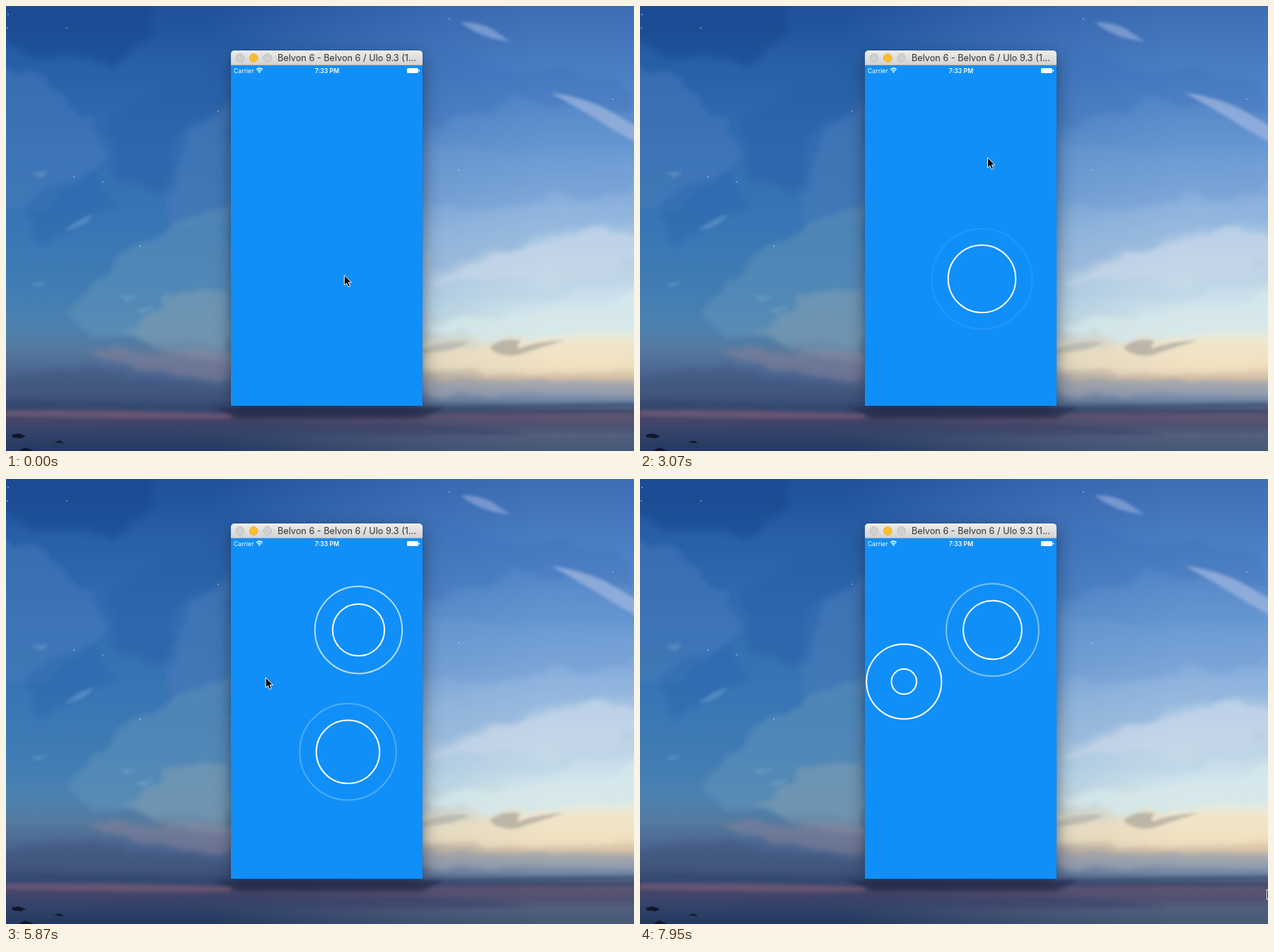
These frames come from a looping animation (888 by 630 pixels, 8 s). An HTML page:

```html
<!DOCTYPE html>
<html lang="en">
<head>
<meta charset="utf-8">
<title>Ripple rings</title>
<style>
  html, body { margin: 0; width: 100%; height: 100%; overflow: hidden; background: #2a5ca8; }
  svg { position: absolute; left: 0; top: 0; display: block; }
  .sky { will-change: transform; }
  .window {
    position: absolute; left: 318px; top: 63px; width: 271px; height: 503px;
    border-radius: 5px 5px 0 0; background: #108ff9;
    box-shadow: 0 0 1px rgba(0, 0, 0, .4), 0 9px 25px rgba(20, 25, 45, .55);
  }
  .bar {
    height: 21px; box-sizing: border-box; border-radius: 5px 5px 0 0;
    background: linear-gradient(#ececec, #d3d3d3);
    border-top: 1px solid #f6f6f6; border-bottom: 1px solid #b5b5b5;
  }
  text { font-family: Inter, Roboto, sans-serif; }
</style>
</head>
<body>
<svg class="sky" width="888" height="630" viewBox="0 0 888 630">
  <defs>
    <linearGradient id="west" x2="0" y2="630" gradientUnits="userSpaceOnUse">
      <stop offset="0" stop-color="#20509a"/>
      <stop offset=".16" stop-color="#2a62aa"/>
      <stop offset=".32" stop-color="#336eb1"/>
      <stop offset=".5" stop-color="#3876b5"/>
      <stop offset=".64" stop-color="#417db4"/>
      <stop offset=".72" stop-color="#4d82b0"/>
      <stop offset=".77" stop-color="#557a9f"/>
      <stop offset=".82" stop-color="#4c6791"/>
      <stop offset=".87" stop-color="#415981"/>
      <stop offset=".9" stop-color="#364a72"/>
      <stop offset=".93" stop-color="#45456a"/>
      <stop offset=".955" stop-color="#36436b"/>
      <stop offset="1" stop-color="#23395f"/>
    </linearGradient>
    <linearGradient id="east" x2="0" y2="630" gradientUnits="userSpaceOnUse">
      <stop offset="0" stop-color="#3f6db4"/>
      <stop offset=".16" stop-color="#4c80c4"/>
      <stop offset=".32" stop-color="#6797d2"/>
      <stop offset=".42" stop-color="#83acdb"/>
      <stop offset=".51" stop-color="#a3c3e2"/>
      <stop offset=".59" stop-color="#c0d4e6"/>
      <stop offset=".67" stop-color="#cfe3ed"/>
      <stop offset=".725" stop-color="#dfebe6"/>
      <stop offset=".76" stop-color="#f2e8cf"/>
      <stop offset=".81" stop-color="#efdcb9"/>
      <stop offset=".835" stop-color="#d3c0a8"/>
      <stop offset=".86" stop-color="#9da3ad"/>
      <stop offset=".885" stop-color="#7287a6"/>
      <stop offset=".9" stop-color="#566685"/>
      <stop offset=".91" stop-color="#454c6c"/>
      <stop offset=".922" stop-color="#5c546f"/>
      <stop offset=".945" stop-color="#4e5272"/>
      <stop offset=".965" stop-color="#525f7d"/>
      <stop offset="1" stop-color="#475875"/>
    </linearGradient>
    <linearGradient id="sweep">
      <stop offset=".32" stop-color="#000"/>
      <stop offset=".52" stop-color="#777"/>
      <stop offset=".68" stop-color="#ccc"/>
      <stop offset=".86" stop-color="#fff"/>
    </linearGradient>
    <mask id="eastMask"><rect width="888" height="630" fill="url(#sweep)"/></mask>
    <filter id="paint" x="-20%" y="-20%" width="140%" height="140%">
      <feTurbulence type="fractalNoise" baseFrequency=".015 .03" numOctaves="4" seed="7"/>
      <feDisplacementMap in="SourceGraphic" scale="36" xChannelSelector="R" yChannelSelector="G"/>
      <feGaussianBlur stdDeviation="3.5"/>
    </filter>
    <filter id="soft"><feGaussianBlur stdDeviation="2"/></filter>
  </defs>
  <rect width="888" height="630" fill="url(#west)"/>
  <rect width="888" height="630" fill="url(#east)" mask="url(#eastMask)"/>

  <g filter="url(#paint)">
    <path d="M-20-20H205L210 45 160 75 70 70-20 45Z" fill="#1a4789" opacity=".5"/>
    <path d="M-20 75 60 105 120 165 148 215 100 250 55 285-20 290Z" fill="#4d7dba" opacity=".45"/>
    <path d="M145 160 225 115 305 90 300 130 240 190 225 265 160 245Z" fill="#215ca2" opacity=".4"/>
    <path d="M318 130 270 165 240 235 225 330 318 310Z" fill="#4a7db9" opacity=".5"/>
    <path d="M30 270 120 230 150 280 90 320 40 340Z" fill="#2465aa" opacity=".4"/>
    <path d="M318 270 240 310 170 350 90 430 120 470 318 480Z" fill="#6697ba" opacity=".45"/>
    <path d="M318 390 230 420 160 470 318 510Z" fill="#8ba2b2" opacity=".45"/>
    <path d="M110 485 200 490 318 490V535L240 522 150 505Z" fill="#8c8499" opacity=".5"/>
    <path d="M-20 525 130 520 318 545V560H-20Z" fill="#40557d" opacity=".5"/>
    <path d="M590 55 700 95 790 88 888 120V150L740 130 590 175Z" fill="#3c70b8" opacity=".35"/>
    <path d="M590 190 720 210 888 235V262L700 280 590 290Z" fill="#6f9bd1" opacity=".4"/>
    <path d="M600 335 720 295 900 280V305L760 325 600 372Z" fill="#8db2dc" opacity=".5"/>
    <path d="M600 392Q700 338 820 320L900 322V362L720 384 600 398Z" fill="#cad8ea" opacity=".65"/>
    <path d="M600 410 730 395 900 370V390L740 412Z" fill="#b9d1e5" opacity=".5"/>
    <path d="M590 455 700 445 900 410V452L690 472Z" fill="#d5e8ec" opacity=".8"/>
    <path d="M590 478H900V510L720 515 590 520Z" fill="#f1e3c5" opacity=".6"/>
    <path d="M590 532 720 527 900 535V548H590Z" fill="#99a2ad" opacity=".6"/>
  </g>
  <g filter="url(#soft)">
    <path d="M770 123Q810 127 850 146L900 176V198L860 176Q820 150 770 123Z" fill="#a3b8e0" opacity=".7"/>
    <path d="M643 23Q668 22 688 33L714 51 688 46Q660 38 643 23Z" fill="#94aedb" opacity=".65"/>
    <path d="M82 318Q100 302 124 295Q112 314 82 318Z" fill="#6b9acb" opacity=".6"/>
    <path d="M35 236 60 234 50 243ZM160 410 190 411 170 419ZM180 430 212 424 195 436ZM35 394 60 390 45 398Z" fill="#74a1c8" opacity=".5"/>
    <path d="M684 484Q700 468 728 474Q720 482 725 485Q750 475 790 473Q750 485 724 494Q698 498 684 484Z" fill="#b5aea0" opacity=".85"/>
    <path d="M588 486Q620 472 656 476Q632 490 588 492Z" fill="#aeb0aa" opacity=".65"/>
    <path d="M0 573Q120 570 318 578V584Q150 585 0 581Z" fill="#7b5c76" opacity=".65"/>
    <path d="M0 557 318 565V570L0 566ZM589 567 888 562V567L589 573Z" fill="#344970" opacity=".6"/>
    <path d="M130 602Q280 588 480 596Q620 588 740 606Q480 612 130 602Z" fill="#36406b" opacity=".5"/>
    <path d="M290 568H620L590 583H330Z" fill="#292e50" opacity=".6"/>
  </g>
  <path d="M8 607 18 605 28 609 22 612 10 611ZM68 618 76 615 82 619ZM18 630 27 625 40 630Z" fill="#10172b"/>
  <g id="stars" fill="#d8e7fa"></g>
</svg>

<div class="window"><div class="bar"></div></div>

<svg width="888" height="630" viewBox="0 0 888 630">
  <defs><clipPath id="screen"><rect x="318" y="84" width="271" height="482"/></clipPath></defs>
  <g stroke-width="1">
    <circle cx="331" cy="73.5" r="5.8" fill="#d0d0d0" stroke="#bdbdbd"/>
    <circle cx="350.3" cy="73.5" r="5.8" fill="#fdbd2f" stroke="#e8ac30"/>
    <circle cx="369.7" cy="73.5" r="5.8" fill="#d0d0d0" stroke="#bdbdbd"/>
  </g>
  <text x="384" y="78" font-size="12.7" fill="#303030">Belvon 6 - Belvon 6 / Ulo 9.3 (1...</text>
  <g fill="#fff">
    <text x="322" y="94.5" font-size="8.7">Carrier</text>
    <text x="454" y="94.5" font-size="8.7" font-weight="600" text-anchor="middle">7:33 PM</text>
    <rect x="567" y="88" width="16" height="7" rx="1.5"/>
    <rect x="583.7" y="90" width="1.4" height="3" rx=".7"/>
    <path d="M356.8 93 358.4 95 360 93Q358.4 91.7 356.8 93Z"/>
  </g>
  <g fill="none" stroke="#fff" stroke-width="1.3">
    <path d="M354 90Q358.4 86 362.8 90M355.6 91.9Q358.4 89.5 361.2 91.9"/>
  </g>
  <g id="rings" clip-path="url(#screen)" fill="none" stroke="#fff" stroke-width="2"></g>
  <path id="cursor" d="M0 0V14.3L3.3 11.3 5.6 16.6 8.2 15.5 5.9 10.3H10.2Z"
        fill="#000" stroke="#fff" stroke-width="1" stroke-linejoin="round"/>
</svg>

<script>
  const LOOP = 8000, PERIOD = 966, RINGS_PER_TAP = 5;
  const FIRST = 1236, STEP = 87;
  const SVG = 'http://www.w3.org/2000/svg';

  const taps = [
    { x: 483.5, y: 386.3, start: 1191 },
    { x: 498.5, y: 213.7, start: 3400 },
    { x: 373.3, y: 286.8, start: 5848 }
  ];

  // Pointer path: time, x, y
  const path = [
    [2193, 478.3, 381], [2850, 488, 231], [3150, 493, 208], [3700, 493, 208],
    [4020, 490.8, 213], [4590, 388, 272], [4803, 376, 278.3], [5400, 367, 281],
    [6370, 367.4, 281.5], [6804, 723.8, 476], [7240, 796, 513], [7935, 886.5, 581]
  ];

  function add(parent, name, attrs) {
    const el = document.createElementNS(SVG, name);
    for (const key in attrs) el.setAttribute(key, attrs[key]);
    return document.getElementById(parent).appendChild(el);
  }

  for (const [cx, cy] of [[3, 12], [86, 31], [2, 31], [96, 242], [137, 249], [300, 149],
                          [189, 340], [627, 18], [858, 132], [640, 232]])
    add('stars', 'circle', { cx, cy, r: .8 });

  const rings = taps.flatMap(tap => Array.from({ length: RINGS_PER_TAP }, (_, i) => ({
    born: tap.start + i * PERIOD,
    el: add('rings', 'circle', { cx: tap.x, cy: tap.y, r: 0, opacity: 0 })
  })));
  const cursor = document.getElementById('cursor');

  // A quick burst that settles into steady growth
  const radius = s => 23.7 * s + 26.6 * (1 - Math.exp(-s / .205));
  const fade = s => s <= 0 ? 0 : Math.max(0, Math.min(1, (1.92 - s) / .62));

  function pointer(t) {
    const i = path.findIndex(p => p[0] > t);
    if (i === 0) return path[0].slice(1);
    if (i < 0) return path[path.length - 1].slice(1);
    const [a, b] = [path[i - 1], path[i]];
    const k = (t - a[0]) / (b[0] - a[0]);
    return [1, 2].map(n => a[n] + (b[n] - a[n]) * k);
  }

  function draw(time) {
    const t = time < FIRST ? 0 : FIRST + STEP * Math.floor((time - FIRST) / STEP);
    for (const { born, el } of rings) {
      const age = (t - born) / 1000;
      el.setAttribute('r', radius(Math.max(0, age)));
      el.setAttribute('opacity', fade(age));
    }
    cursor.setAttribute('transform', `translate(${pointer(t)})`);
  }

  const origin = performance.now();
  function tick() {
    draw((performance.now() - origin) % LOOP);
    requestAnimationFrame(tick);
  }
  tick();
</script>
</body>
</html>
```
